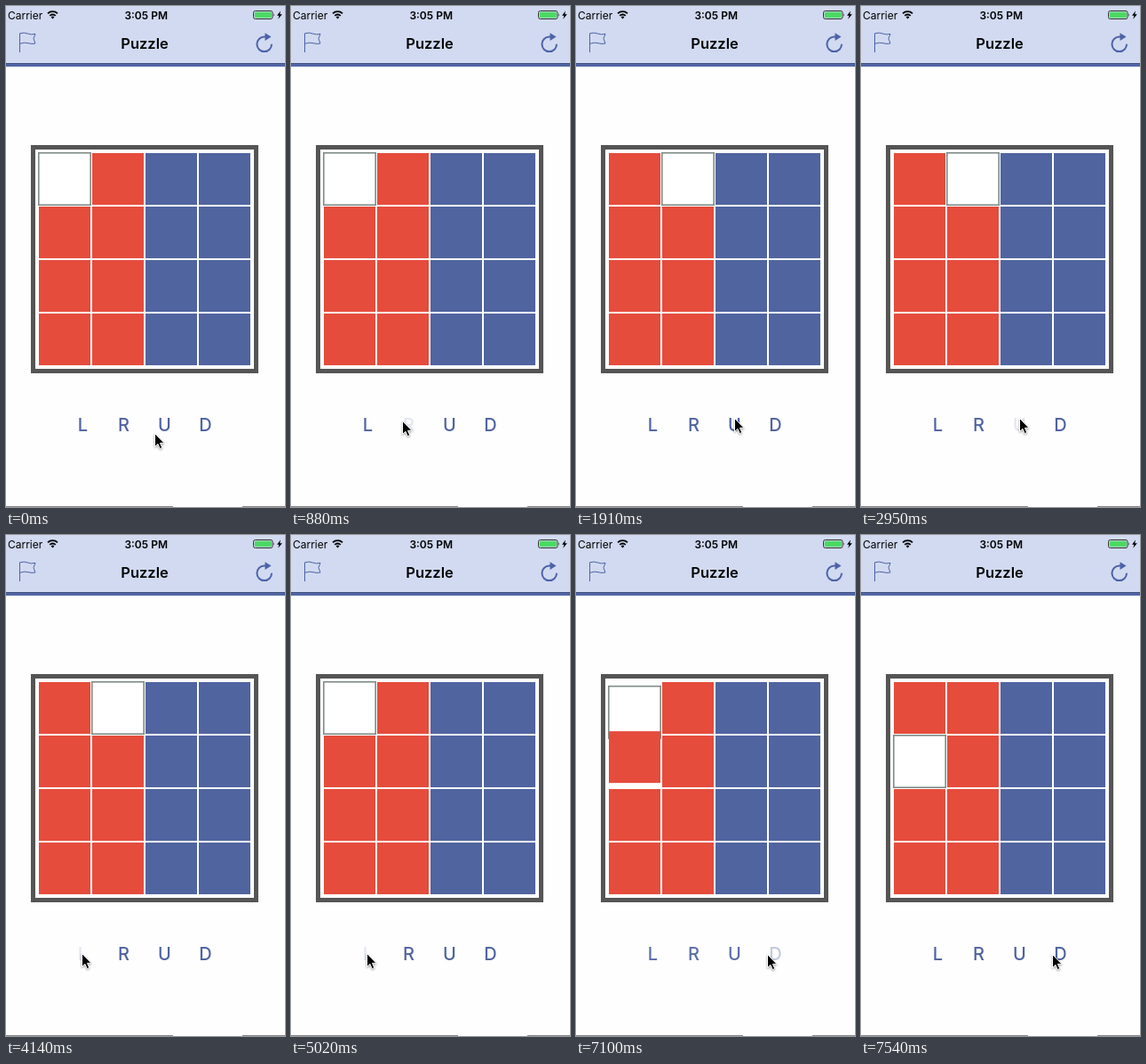
An HTML page that plays this animation: 314 by 562 pixels, repeating every 8000 ms.

```html
<!DOCTYPE html>
<html lang="en">
<head>
<meta charset="utf-8">
<title>Puzzle</title>
<style>
  html, body { margin: 0; width: 100%; height: 100%; overflow: hidden; background: #fefefe; }
  svg { display: block; width: 100%; height: 100%; font-family: Inter, "Liberation Sans", sans-serif; }
  .line { fill: none; stroke: #4d62a8; }
  .mid { text-anchor: middle; }
  #keys { font-size: 20px; font-weight: 500; fill: #4f63a1; }
</style>
</head>
<body>
<svg viewBox="0 0 314 562">
  <rect width="314" height="65" fill="#d1daf0"/>
  <rect y="64" width="314" height="4" fill="#5267a5"/>
  <rect y="64" width="314" height="1" fill="#3f5080"/>

  <text x="2" y="14.5" font-size="12">Carrier</text>
  <g fill="none" stroke="#000" stroke-width="1.8">
    <path d="M47 8.4a8 8 0 0 1 11 0M49.2 10.9a5 5 0 0 1 6.6 0"/>
    <path d="M52.5 14.6l-1.9-2.1a2.8 2.8 0 0 1 3.8 0z" fill="#000" stroke="none"/>
  </g>
  <text class="mid" x="157.7" y="14.5" font-size="12" font-weight="600">3:05 PM</text>
  <rect x="278.5" y="5.5" width="21.5" height="9" rx="2" fill="none" stroke="#333"/>
  <rect x="279.8" y="6.8" width="19" height="6.4" rx="1" fill="#4cd964"/>
  <path d="M301 8.3q1.6 1.7 0 3.4z" fill="#333"/>
  <path d="M309 5.5l-4 5.2h2.4l-1.2 4 4.6-5.4h-2.6z"/>

  <path class="line" d="M15.5 52V30.8q5-1.5 9 .2t8.5.3l-2 5.3 2 5.4q-4 1-8-.3t-9.5.6"/>
  <text class="mid" x="156" y="48" font-size="16.5" font-weight="600">Puzzle</text>
  <path class="line" stroke-width="2" d="M299 42.8a8.3 8.3 0 1 1-8.3-8.3h2"/>
  <path d="M291.5 30.2l7 4.4-7 4.4z" fill="#4d62a8"/>

  <rect x="30.5" y="158.5" width="251" height="251" fill="#fff" stroke="#555" stroke-width="5"/>
  <rect id="blank" x="36.8" y="164.8" width="58.4" height="58.4" fill="#fff" stroke="#7f8c87" stroke-width="1.6"/>
  <g id="tiles"></g>
  <g id="keys" class="mid"></g>

  <path d="M0 561.5H188M266 561.5H314" stroke="#858585"/>
  <path id="cursor" d="M.5.5V15.5l3.4-3.2 2.3 5.3 2.6-1.1-2.3-5.2h4.5z" stroke="#fff" stroke-width="1"
    style="filter: drop-shadow(0 1px 1px #0006)"/>
</svg>
<script>
const LOOP = 8000, TICK = 148, CELL = 60, SLIDE = 2, FADE = 3;
const $ = id => document.getElementById(id);

function add(parent, tag, attrs, text = "") {
  const el = document.createElementNS("http://www.w3.org/2000/svg", tag);
  for (const name in attrs) el.setAttribute(name, attrs[name]);
  el.textContent = text;
  return parent.appendChild(el);
}

const tiles = {};
for (let row = 0; row < 4; row++)
  for (let col = 0; col < 4; col++)
    if (row + col)
      tiles[`${col},${row}`] = add($("tiles"), "rect", {
        x: 37 + CELL * col, y: 165 + CELL * row, width: 58, height: 58,
        fill: col < 2 ? "#e64c3c" : "#5064a0"
      });

const keys = [..."LRUD"].map((name, i) =>
  add($("keys"), "text", { x: 86.5 + 46 * i, y: 477 }, name));

// All times below are in ticks: the screen refreshes once per tick.
const presses = [["R", 6, 6.35], ["U", 15, 15.3], ["U", 20, 20.7],
  ["L", 28, 29.7], ["L", 33.9, 35.7], ["D", 47, 47.65]];
const path = [[0, 167, 479], [4, 125, 465], [9, 125, 465], [13, 178, 462], [23, 178, 462],
  [27, 85, 469], [40, 85, 469], [43, 182, 473], [44, 182, 473], [46, 215, 470], [55, 215, 470]];

const clamp = u => Math.min(1, Math.max(0, u));
const ease = u => (u = clamp(u), u * u * (3 - 2 * u));
const slide = (t, start) => CELL * ease((t - start) / SLIDE);
const move = (el, x, y) => el.setAttribute("transform", `translate(${x} ${y})`);

function cursorAt(t) {
  const i = path.findIndex(p => p[0] > t);
  const [t0, x0, y0] = path[i - 1], [t1, x1, y1] = path[i];
  const u = ease((t - t0) / (t1 - t0));
  return [x0 + (x1 - x0) * u, y0 + (y1 - y0) * u];
}

// The pressed key fades back after release while the others dip briefly.
function keyAlpha(name, t) {
  const last = presses.filter(p => p[1] <= t).pop();
  if (!last) return 1;
  const [pressed, , release] = last;
  const u = clamp((t - release) / FADE);
  return pressed === name ? 1 - 0.85 * (1 - u) ** 2 : 1 - 0.2 * Math.sin(Math.PI * u);
}

function draw(now) {
  const t = Math.floor((now % LOOP + 18) / TICK);
  const across = slide(t, 6.35) - slide(t, 29.7);
  const down = slide(t, 47.65);
  move($("blank"), across, down);
  move(tiles["1,0"], -across, 0);
  move(tiles["0,1"], 0, -down);
  for (const key of keys) key.setAttribute("opacity", keyAlpha(key.textContent, t));
  move($("cursor"), ...cursorAt(t));
}

const start = performance.now();
function loop() {
  draw(performance.now() - start);
  requestAnimationFrame(loop);
}
loop();
</script>
</body>
</html>
```
